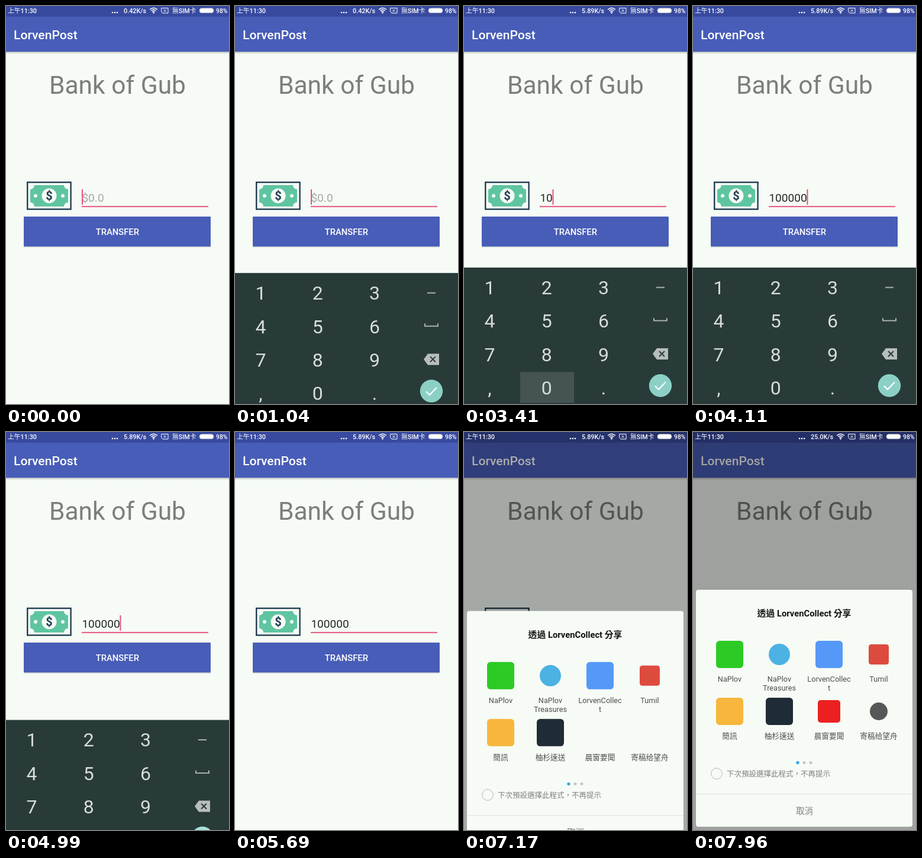
Write an HTML page that moves like this. It is 377 px wide and 671 px high and loops after 8 s.

```html
<!DOCTYPE html>
<html lang="zh-TW">
<head>
<meta charset="utf-8">
<style>
html, body { margin: 0; width: 100%; height: 100%; overflow: hidden; background: #f6fbf5; }
svg { display: block; font-family: Roboto, 'Noto Sans CJK TC', 'Noto Sans CJK', sans-serif; }
.mid { text-anchor: middle; }
.med { font-weight: 500; }
</style>
</head>
<body>
<svg width="377" height="671" viewBox="0 0 377 671">
  <defs>
    <linearGradient id="shade" x2="0" y2="1">
      <stop stop-color="#8f9690" stop-opacity=".6"/>
      <stop offset="1" stop-color="#8f9690" stop-opacity="0"/>
    </linearGradient>
  </defs>

  <rect width="377" height="671" fill="#f6fbf5"/>
  <rect width="377" height="18" fill="#384a9f"/>
  <rect y="18" width="377" height="59" fill="#485db7"/>
  <rect y="77" width="377" height="4" fill="url(#shade)"/>
  <text class="med" x="13" y="56" font-size="21.1" fill="#fff">LorvenPost</text>
  <text class="mid" x="188.5" y="148" font-size="42.5" fill="#7b7f7a">Bank of Gub</text>

  <!-- banknote -->
  <rect x="36.2" y="297.2" width="73.4" height="45.4" fill="#f6fbf5" stroke="#213f52" stroke-width="2.4"/>
  <path d="M48 302H98A7 7 0 0 0 105 309V331A7 7 0 0 0 98 338H48A7 7 0 0 0 41 331V309A7 7 0 0 0 48 302Z" fill="#5fc5a1"/>
  <g fill="#f6fbf5"><circle cx="73" cy="320" r="12.5"/><circle cx="50" cy="320" r="3"/><circle cx="96" cy="320" r="3"/></g>
  <text class="mid" x="73" y="327" font-size="20" font-weight="700" fill="#213f52">$</text>

  <!-- amount field -->
  <text id="amount" x="128.4" y="329.6" font-size="19.1"/>
  <rect x="128" y="337" width="214" height="2.2" fill="#e9648a"/>
  <rect id="caret" y="309" width="2" height="26" fill="#e9517e"/>

  <rect x="30" y="404" width="316" height="4" fill="url(#shade)"/>
  <rect x="30" y="355" width="316" height="50.5" rx="1" fill="#485db7"/>
  <text class="mid med" x="188.3" y="386" font-size="14.8" fill="#fff">TRANSFER</text>

  <g id="keyboard">
    <rect y="441" width="377" height="231" fill="#283b39"/>
    <rect id="pressed" width="91" height="52" fill="#455452"/>
    <g id="keys" class="mid" font-size="32" fill="#d8dcda"></g>
    <path d="M325 474.5H339M321 526V530.5H343V526" fill="none" stroke="#a9b0ae" stroke-width="2"/>
    <path d="M319 586.5L326 577H345V596H326Z" fill="#b8bebc"/>
    <path d="M330 582L339 591M339 582L330 591" stroke="#283b39" stroke-width="2"/>
    <circle id="done" cx="332" cy="640" r="19.2"/>
    <path d="M323 640.5L329 646.5L341 634" fill="none" stroke="#fff" stroke-width="2.2"/>
  </g>

  <rect id="dim" width="377" height="671"/>

  <!-- status bar -->
  <g class="med" font-size="10.8" fill="#fff">
    <text x="3" y="11.5">上午11:30</text>
    <circle cx="180" cy="11" r="1.3"/><circle cx="184" cy="11" r="1.3"/><circle cx="188" cy="11" r="1.3"/>
    <text id="speed" x="199" y="11.5"/>
    <g fill="none" stroke="#fff" stroke-width="1.3">
      <path d="M243 6Q249.5 .5 256 6M245.3 8Q249.5 4.5 253.7 8M247.3 10Q249.5 8 251.7 10"/>
      <path d="M262.7 3.5H274V12H265L262.7 9.5ZM266.5 5.8L270.5 9.8M270.5 5.8L266.5 9.8" stroke-width="1"/>
    </g>
    <circle cx="249.5" cy="11.5" r="1.2"/>
    <text x="281" y="11.5">無SIM卡</text>
    <rect x="327" y="3.8" width="24" height="7.8" rx="3.9" fill="#fff" stroke="#b4bac8" stroke-width=".8"/>
    <text x="355" y="11.5" font-size="10.4">98%</text>
  </g>

  <g id="sheet">
    <rect x="5" y="266" width="366" height="399.5" rx="4" fill="#f6fbf5"/>
    <text class="mid" x="188" y="311" font-size="14.8" font-weight="700" fill="#111">透過 LorvenCollect 分享</text>
    <g id="apps" class="mid" font-size="12.7" fill="#4b4f4b"></g>
    <circle cx="177" cy="557.5" r="2.7" fill="#38a9ea"/>
    <circle cx="188" cy="557.5" r="2.5" fill="#c4c8c4"/>
    <circle cx="199" cy="557.5" r="2.5" fill="#c4c8c4"/>
    <circle cx="40" cy="576" r="9.3" fill="none" stroke="#b3b7b3"/>
    <text x="57" y="581" font-size="12.5" fill="#7d817c">下次預設選擇此程式，不再提示</text>
    <path d="M5 610.5H371" stroke="#dce0db"/>
    <text class="mid" x="188.5" y="644" font-size="14.6" fill="#80847f">取消</text>
  </g>
</svg>
<script>
const $ = id => document.getElementById(id);
const LOOP = 8000;
const clamp = v => Math.max(0, Math.min(1, v));
const during = (t, spans) => spans.some(([from, to]) => t >= from && t < to);
// last value whose start time has passed
const latest = (t, steps) => steps.filter(([at]) => t >= at).pop()[1];

const typed = [[0, ''], [2790, '1'], [3150, '10'], [3500, '100'], [3680, '1000'], [3850, '10000'], [3940, '100000']];
const speeds = [[0, '0.42K/s'], [3240, '5.89K/s'], [7400, '25.0K/s']];
const caretOff = [[600, 780], [1660, 2180], [4460, 4900], [5690, LOOP]];
const onePress = [[2700, 2880]];
const zeroPress = [[3060, 3150], [3330, 3500], [3590, 3680], [3760, 3940]];

$('keys').innerHTML = [...'123456789,0.'].map((key, i) =>
  `<text x="${43.5 + i % 3 * 96.2}" y="${486 + Math.floor(i / 3) * 56.4}">${key}</text>`).join('');

// colour, half size, round?, label lines
const apps = [
  ['#2dca25', 23, 0, 'NaPlov'], ['#4bb2e3', 18, 1, 'NaPlov', 'Treasures'],
  ['#5598f8', 23, 0, 'LorvenCollec', 't'], ['#dd4b3e', 17, 0, 'Tumil'],
  ['#f7b73c', 23, 0, '簡訊'], ['#1f2b36', 23, 0, '柚杉速送'],
  ['#ec2020', 19, 0, '晨窗要聞'], ['#555856', 15, 1, '寄稿给望舟']
];
$('apps').innerHTML = apps.map(([color, r, round, ...lines], i) => {
  const x = 62 + i % 4 * 84, y = 375 + Math.floor(i / 4) * 96;
  return `<rect x="${x - r}" y="${y - r}" width="${2 * r}" height="${2 * r}" rx="${round ? r : r / 4}" fill="${color}"/>` +
    lines.map((line, n) => `<text x="${x}" y="${y + 46 + n * 15}">${line}</text>`).join('');
}).join('');
const icons = $('apps').querySelectorAll('rect');

function draw(t) {
  const value = latest(t, typed), amount = $('amount');
  amount.textContent = value || '$0.0';
  amount.setAttribute('fill', value ? '#252826' : '#a3a8a2');
  $('caret').setAttribute('x', 128 + (value ? amount.getComputedTextLength() : 0));
  $('caret').style.opacity = during(t, caretOff) ? 0 : 1;
  $('speed').textContent = latest(t, speeds);

  const rise = 1 - (1 - clamp((t - 780) / 360)) ** 2.5;
  const fall = clamp((t - 4820) / 350) ** 2.3;
  $('keyboard').setAttribute('transform', `translate(0 ${231 * (1 - rise + fall)})`);
  const one = during(t, onePress);
  $('pressed').style.opacity = one || during(t, zeroPress) ? 1 : 0;
  $('pressed').setAttribute('x', one ? -1 : 95);
  $('pressed').setAttribute('y', one ? 448 : 617);
  const lit = clamp((t - 4460) / 180);
  $('done').setAttribute('fill', `rgb(${140 + 28 * lit},${208 + 17 * lit},${197 + 20 * lit})`);

  // the sheet is already a quarter open when it appears
  const open = t < 7000 ? 0 : 1 - (1 - clamp((t - 6960) / 300)) ** 2;
  $('dim').style.opacity = .36 * open;
  $('sheet').style.opacity = clamp(2.1 * open);
  $('sheet').setAttribute('transform', `translate(0 ${407.5 * (1 - open)})`);
  // icons load one after another
  icons.forEach((icon, i) => icon.style.opacity = t >= 6950 + i * 40 ? 1 : 0);
}

const start = performance.now();
function tick() {
  draw((performance.now() - start) % LOOP);
  requestAnimationFrame(tick);
}
tick();
</script>
</body>
</html>
```
